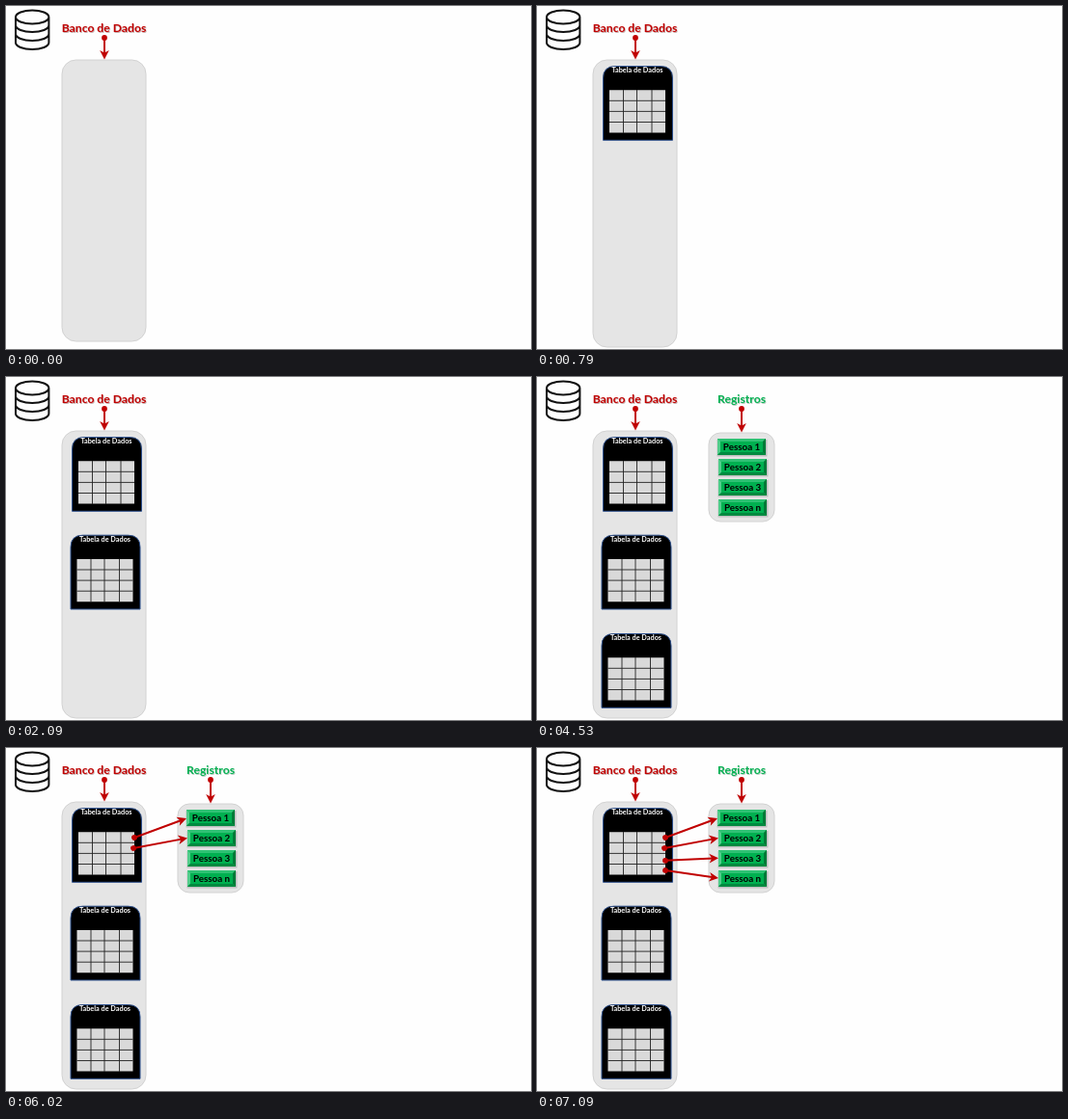
An HTML page for the animation above (8 s loop, 544 by 356 pixels).

```html
<!DOCTYPE html>
<html lang="pt">
<head>
<meta charset="utf-8">
<style>
  html, body { margin: 0; width: 100%; height: 100%; overflow: hidden; background: #fefefe; }
  svg { display: block; width: 544px; height: 356px; }
  text { font-family: Lato, "Open Sans", sans-serif; font-weight: 700; text-anchor: middle; }
  .panel { fill: #e5e5e5; stroke: #d2d2d2; }
  .title { font-size: 12.2px; }
</style>
</head>
<body>
<svg id="stage" viewBox="0 0 544 356"></svg>
<script>
const LOOP = 8000;
const RED = '#c00000';
const GREEN = '#00b050';

const panel = (x, y, w, h, r) =>
  `<rect class="panel" x="${x}" y="${y}" width="${w}" height="${h}" rx="${r}"/>`;

const title = (x, label, color, shadow) =>
  `<text class="title" x="${x + 0.8}" y="27.8" fill="${shadow}">${label}</text>
   <text class="title" x="${x}" y="27" fill="${color}">${label}</text>`;

// Dot at the start, swept-back head at the end.
function arrow(x1, y1, x2, y2) {
  const length = Math.hypot(x2 - x1, y2 - y1);
  const angle = Math.atan2(y2 - y1, x2 - x1) * 180 / Math.PI;
  return `<g transform="translate(${x1} ${y1}) rotate(${angle})" fill="${RED}">
    <circle r="2.9"/>
    <path d="M0 0H${length - 5}" stroke="${RED}" stroke-width="1.9"/>
    <path d="M${length} 0l-9.5 -4.8l2.6 4.8l-2.6 4.8z"/>
  </g>`;
}

function cylinder() {
  const bands = [11.5, 20, 29, 38].map(y => `M10 ${y}a17.2 7 0 0 0 34.4 0`).join('');
  return `<path d="${bands}M10 38V11.5a17.2 7 0 0 1 34.4 0V38"
    fill="none" stroke="#111" stroke-width="2"/>`;
}

const table = (dx, dy) => `<g transform="translate(${dx} ${dy})">
  <path d="M68.5 139.3V75q0 -12.5 12.5 -12.5H128q12.5 0 12.5 12.5V139.3z"
    fill="#000" stroke="#2f528f"/>
  <text x="104" y="69" font-size="7.3" fill="#fff">Tabela de Dados</text>
  <path d="M75 87.2h58v44.4h-58z" fill="#d9d9d9"/>
  <path d="M89.5 87v45M103.5 87v45M119 87v45M75 98.3h58M75 109.4h58M75 120.5h58"
    stroke="#222" stroke-width=".9"/>
</g>`;

const button = (x, y, label) => `<g transform="translate(${x} ${y})">
  <rect x="-.5" y="1" width="52" height="17.5" fill="#000" opacity=".16"/>
  <path d="M0 0h50v17h-50z" fill="${GREEN}"/>
  <path d="M0 0h50l-3 3h-44z" fill="#2fc274"/>
  <path d="M0 0l3 3v11l-3 3z" fill="#52cd8b"/>
  <path d="M50 0v17l-3 -3v-11z" fill="#007a38"/>
  <path d="M0 17l3 -3h44l3 3z" fill="#008a40"/>
  <text x="25" y="12.3" font-size="9.8" fill="#000">${label}</text>
</g>`;

const records = () => title(212, 'Registros', GREEN, '#c4cfc8') +
  panel(178, 58, 68, 92, 12) + arrow(212, 33, 212, 57.5) +
  button(187, 64, 'Pessoa 1') + button(188, 85, 'Pessoa 2') +
  button(188, 106, 'Pessoa 3') + button(188, 127, 'Pessoa n');

// [start, end, markup] in drawing order.
const parts = [
  [0, LOOP, cylinder() + title(101.5, 'Banco de Dados', RED, '#c9b5b5')],
  [0, 790, panel(58, 56, 87, 292, 14.5)],
  [790, LOOP, panel(58, 56, 87, 298, 14.5)],
  [0, LOOP, arrow(102, 33, 102, 55.5)],
  [790, LOOP, table(0, 0)],
  [2090, LOOP, table(-1.5, 101.7)],
  [3440, LOOP, table(-1.5, 204)],
  [4530, LOOP, records()],
  [5470, LOOP, arrow(133, 93, 187, 73)],
  [6020, LOOP, arrow(132, 104, 188, 93.5)],
  [6560, LOOP, arrow(133, 116.8, 188, 114.2)],
  [7090, LOOP, arrow(133, 127, 188, 135)]
];

const stage = document.getElementById('stage');
stage.innerHTML = parts.map(([, , markup]) => `<g>${markup}</g>`).join('');
const groups = [...stage.children];
const origin = performance.now();

function draw() {
  const time = (performance.now() - origin) % LOOP;
  parts.forEach(([start, end], i) => {
    groups[i].style.display = time >= start && time < end ? '' : 'none';
  });
  requestAnimationFrame(draw);
}
draw();
</script>
</body>
</html>
```
